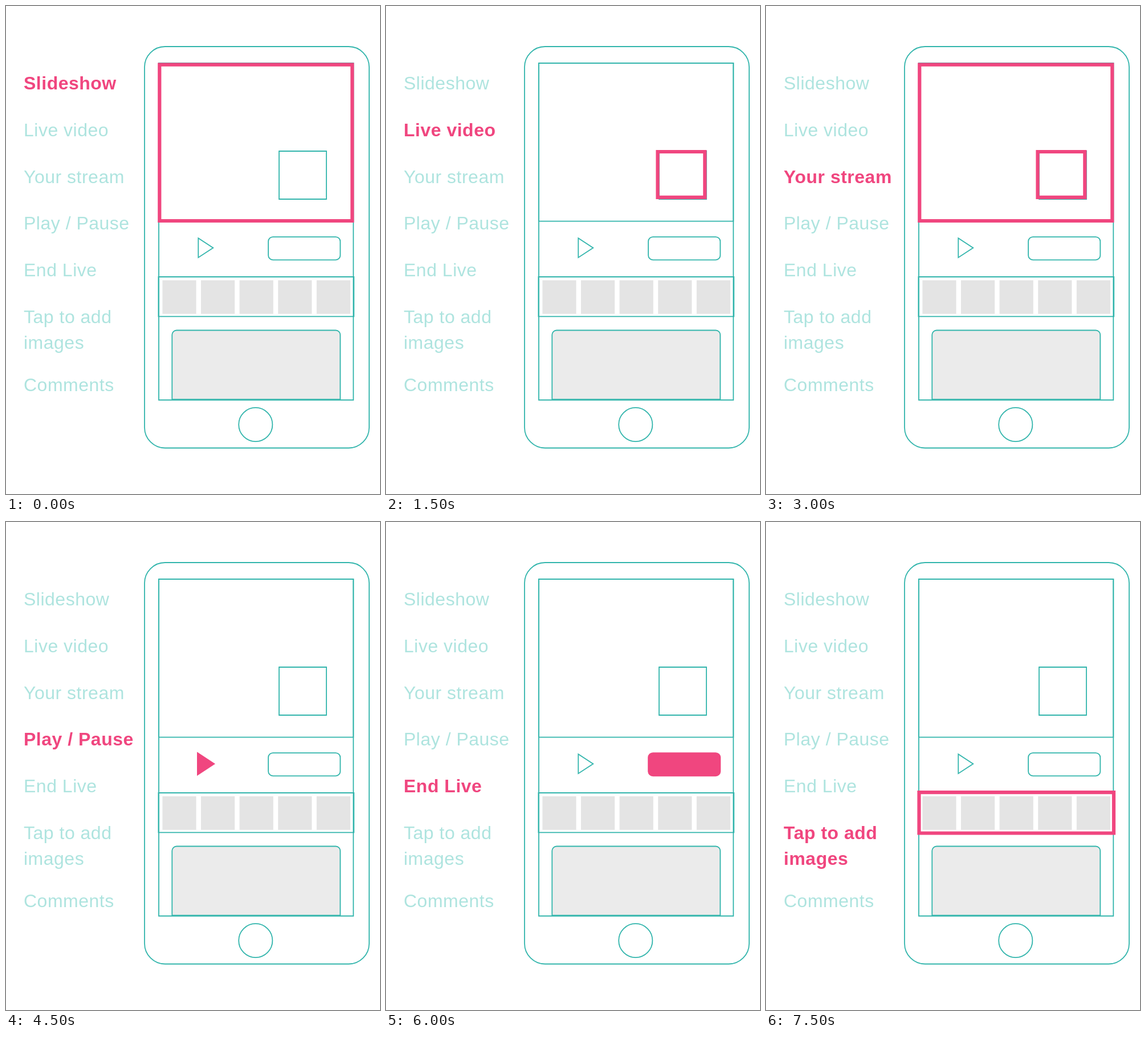
Animation, 656 px wide and 854 px high, one loop 8 s. Source, as an HTML page with a canvas:

```html
<!DOCTYPE html>
<html lang="en">
<head>
<meta charset="utf-8">
<title>Phone screen guide</title>
<style>
  html, body { margin: 0; width: 100%; height: 100%; overflow: hidden; background: #fff; }
  canvas { display: block; width: 656px; height: 854px; }
</style>
</head>
<body>
<canvas id="stage"></canvas>
<script>
const W = 656, H = 854, LOOP = 8000, STEP = 1500;
const TEAL = '#32b5ac', PALE = '#aee4df', PINK = '#f0467f';
const TILE = '#e4e4e4', PANEL = '#ebebeb';
const THIN = 1.8, THICK = 6.2;

const labels = [
  { y: 145.8, lines: ['Slideshow'] },
  { y: 227.7, lines: ['Live video'] },
  { y: 309.6, lines: ['Your stream'] },
  { y: 391.4, lines: ['Play / Pause'] },
  { y: 473.3, lines: ['End Live'] },
  { y: 555.2, lines: ['Tap to add', 'images'] },
  { y: 673.7, lines: ['Comments'] }
];

const canvas = document.getElementById('stage');
const ctx = canvas.getContext('2d');
const ratio = window.devicePixelRatio || 1;
canvas.width = W * ratio;
canvas.height = H * ratio;
ctx.scale(ratio, ratio);

function paint(fill, stroke, width = THIN) {
  if (fill) {
    ctx.fillStyle = fill;
    ctx.fill();
  }
  if (stroke) {
    ctx.strokeStyle = stroke;
    ctx.lineWidth = width;
    ctx.stroke();
  }
}

// Box given by its edges; radius may be a list of corners.
function box(left, top, right, bottom, radius, fill, stroke, width) {
  ctx.beginPath();
  ctx.roundRect(left, top, right - left, bottom - top, radius);
  paint(fill, stroke, width);
}

function triangle(left, right, middle, half, fill, stroke) {
  ctx.beginPath();
  ctx.moveTo(left, middle - half);
  ctx.lineTo(right, middle);
  ctx.lineTo(left, middle + half);
  ctx.closePath();
  paint(fill, stroke);
}

function drawLabels(active) {
  ctx.letterSpacing = '0.5px';
  labels.forEach(({ y, lines }, i) => {
    const on = i === active;
    ctx.font = `${on ? 'bold' : 'normal'} 32px "Liberation Sans", Arial, sans-serif`;
    ctx.fillStyle = on ? PINK : PALE;
    lines.forEach((line, row) => ctx.fillText(line, 31, y + row * 45));
  });
}

function drawPhone() {
  box(243, 71, 637, 773.5, 36, null, TEAL);
  box(268, 100, 609.3, 689.5, 0, null, TEAL);
  box(268, 100, 609.3, 376.6, 0, null, TEAL);
  box(479, 254, 562, 338, 0, null, TEAL);
  box(267.4, 474, 610.2, 543.3, 0, null, TEAL);
  for (let i = 0; i < 5; i++) {
    const x = 274.4 + i * 67.6;
    box(x, 480, x + 59.2, 538.7, 0, TILE);
  }
  box(291.3, 567.5, 586.3, 688.5, [8, 8, 0, 0], PANEL, TEAL);
  ctx.beginPath();
  ctx.arc(437.8, 732.5, 29.6, 0, Math.PI * 2);
  paint(null, TEAL);
}

function drawControls(active) {
  if (active === 3) triangle(335, 367, 423.2, 21, PINK);
  else triangle(337.3, 363.3, 423.2, 17, null, TEAL);
  if (active === 4) box(459.2, 403.2, 587.2, 445.2, 9, PINK);
  else box(460.1, 404.1, 586.3, 444.3, 8, null, TEAL);
}

function drawHighlight(active) {
  const frame = (...edges) => box(...edges, 0, null, PINK, THICK);
  if (active === 0 || active === 2) frame(269.3, 102.6, 607.3, 376);
  if (active === 1 || active === 2) frame(476.5, 255, 559.3, 334.8);
  if (active === 5) frame(268.5, 473.2, 610, 544.5);
}

function draw(now) {
  const active = Math.floor((now % LOOP) / STEP);
  ctx.fillStyle = '#fff';
  ctx.fillRect(0, 0, W, H);
  drawLabels(active);
  drawPhone();
  drawControls(active);
  drawHighlight(active);
}

const start = performance.now();
function tick() {
  draw(performance.now() - start);
  requestAnimationFrame(tick);
}
tick();
</script>
</body>
</html>
```
